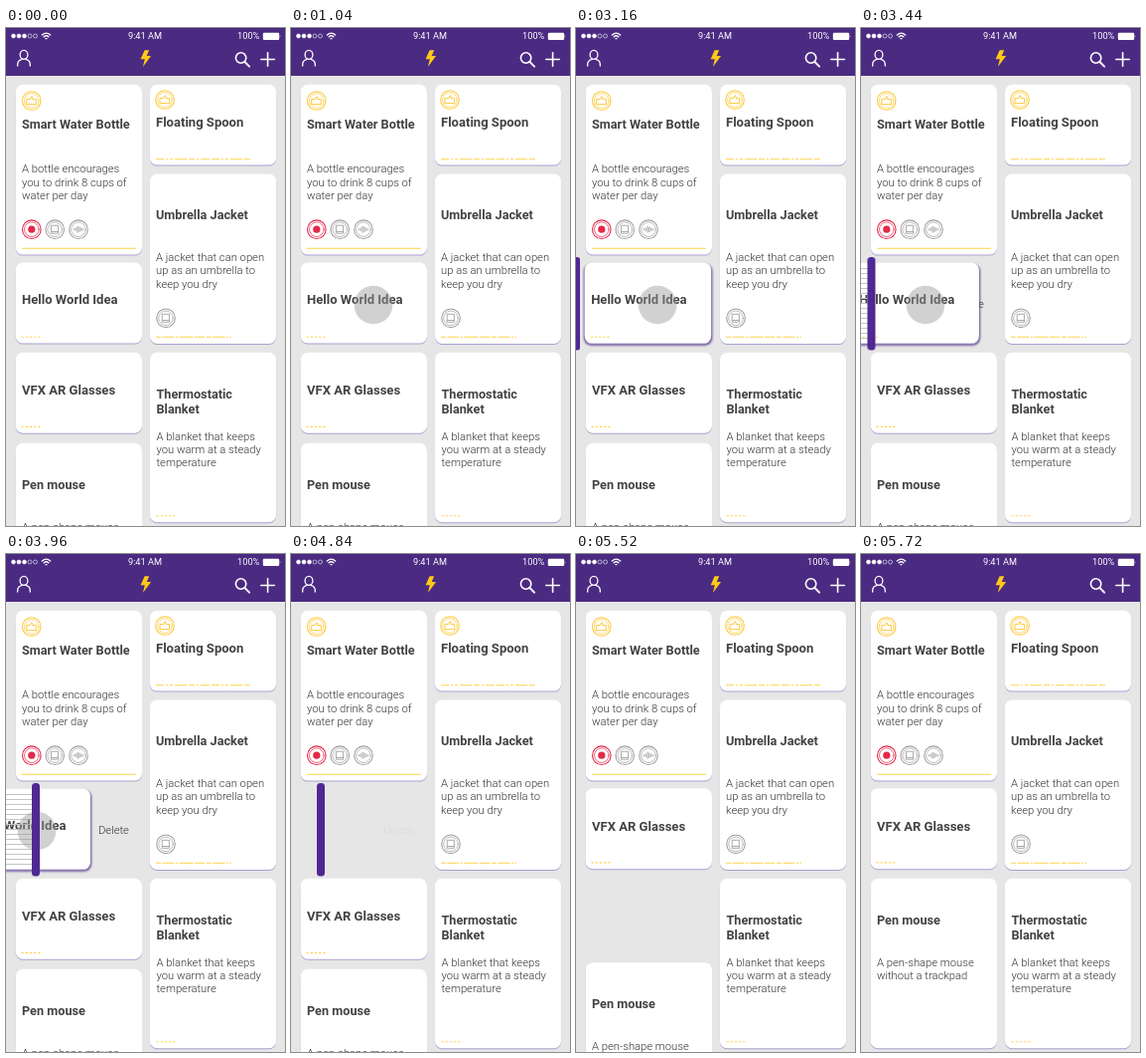
Recreate the animation shown at these times as an HTML page. Size 281 px wide and 500 px high, loop 6.76 s.

```html
<!DOCTYPE html>
<html lang="en">
<head>
<meta charset="utf-8">
<title>Swipe to shred</title>
<style>
  html, body { margin: 0; width: 100%; height: 100%; overflow: hidden; background: #e6e6e6; }
  svg { display: block; width: 281px; height: 500px; font-family: Roboto, sans-serif; }

  .card { fill: #fff; filter: drop-shadow(0 1.5px .3px #aaa0d0); }
  .title { font-size: 12.7px; font-weight: 700; fill: #424242; }
  .short { font-size: 13.05px; }
  .body { font-size: 11.24px; font-weight: 300; fill: #333; }
  .status { font-size: 9.2px; fill: #fff; }
  .line { fill: none; stroke: #ffd24a; stroke-width: 1.1; }
  .dots { stroke-dasharray: 2.2 2; }
  .icon { fill: none; stroke: currentColor; stroke-linecap: round; stroke-linejoin: round; }
  .like { color: #fdc93c; }
  .grey { color: #a0a0a0; }
  .red { color: #e4284a; }

  .card-move, .touch-move, .touch, .lift, .bar, .label, .first-up, .second-up {
    animation: 6760ms ease-in-out infinite both;
  }
  .card-move { animation-name: card-move; }
  .touch-move { animation-name: touch-move; }
  .touch { animation-name: touch; }
  .lift { animation-name: lift; }
  .bar { animation-name: bar; }
  .label { animation-name: label; }
  .first-up { animation-name: first-up; }
  .second-up { animation-name: second-up; }

  @keyframes touch {
    0%, 12.426% { opacity: 0; }
    15.385%, 65.68% { opacity: 1; }
    68.639%, 100% { opacity: 0; }
  }
  @keyframes lift {
    0%, 24.852% { opacity: 0; }
    27.811%, 100% { opacity: .95; }
  }
  @keyframes bar {
    0%, 34.32% { transform: translateX(-4px); }
    37.87%, 45.562% { transform: translateX(0); }
    58.58%, 74.556% { transform: translateX(30px); }
    77.219%, 100% { transform: translateX(-5px); }
  }
  @keyframes card-move {
    0%, 45.562% { transform: translateX(0); }
    58.58%, 65.68% { transform: translateX(-52px); }
    71.598%, 100% { transform: translateX(-142px); }
  }
  @keyframes touch-move {
    0%, 45.562% { transform: translateX(0); }
    58.58%, 100% { transform: translateX(-52px); }
  }
  @keyframes label {
    0%, 65.68% { opacity: 1; }
    71.598%, 74.556% { opacity: .06; }
    77.219%, 100% { opacity: 0; }
  }
  @keyframes first-up {
    0%, 77.219% { transform: translateY(0); }
    80.991%, 100% { transform: translateY(-90.5px); }
  }
  @keyframes second-up {
    0%, 80.991% { transform: translateY(0); }
    84.615%, 100% { transform: translateY(-91px); }
  }
</style>
</head>
<body>
<svg viewBox="0 0 281 500">
  <defs>
    <g id="ring" class="icon">
      <circle r="9.3" stroke-width="1.1"/>
      <circle r="7.3" stroke-width=".7"/>
    </g>
    <g id="like" class="icon like" stroke-width="1">
      <use href="#ring"/>
      <path d="M-4.6-1.4h3.2l1.4-3q1.6.2 1 3h3.6v5h-9.2z"/>
    </g>
    <g id="device" class="icon grey" stroke-width=".9">
      <use href="#ring"/>
      <path d="M-3.4-4h6.8v8h-6.8zM-3.4 2.2h6.8"/>
    </g>
    <g id="sound" class="icon grey" stroke-width="1">
      <use href="#ring"/>
      <path d="M-4.6-.4v.8M-2.8-1.4v2.8M-.9-3v6M.9-2.3v4.6M2.8-1.4v2.8M4.6-.4v.8"/>
    </g>
    <pattern id="strips" width="10" height="5" y="241" patternUnits="userSpaceOnUse">
      <path d="M0 .5h10" stroke="#c4c4c4"/>
    </pattern>
    <clipPath id="shredded"><rect class="bar" x="-160" y="225" width="160" height="105"/></clipPath>
    <filter id="soft" x="-10%" y="-10%" width="120%" height="120%"><feGaussianBlur stdDeviation="1.3"/></filter>
  </defs>

  <rect width="281" height="500" fill="#e6e6e6"/>

  <!-- right column -->
  <rect class="card" x="144.8" y="56.8" width="127.4" height="80.8" rx="7.5"/>
  <use href="#like" x="160" y="72"/>
  <text class="title short" x="151" y="99.3">Floating Spoon</text>
  <path class="line" d="M151 131.8h96" stroke-dasharray="8 2 2 2 3 2 12 2 6 2 2 2 9 2"/>

  <rect class="card" x="144.8" y="146.5" width="127.4" height="170.5" rx="7.5"/>
  <text class="title" x="151" y="192.3">Umbrella Jacket</text>
  <text class="body" y="234"><tspan x="151">A jacket that can open</tspan><tspan x="151" dy="13.3">up as an umbrella to</tspan><tspan x="151" dy="13.3">keep you dry</tspan></text>
  <use href="#device" x="161" y="291.3"/>
  <path class="line" d="M151 310.3h76" stroke-dasharray="5 1.5 12 1.5 2 1.5 14 1.5 10 2"/>

  <rect class="card" x="144.8" y="325.7" width="127.4" height="170.5" rx="7.5"/>
  <text class="title" y="371.7"><tspan x="151.5">Thermostatic</tspan><tspan x="151.5" dy="14.8">Blanket</tspan></text>
  <text class="body" y="413.8"><tspan x="151.5">A blanket that keeps</tspan><tspan x="151.5" dy="13.3">you warm at a steady</tspan><tspan x="151.5" dy="13.3">temperature</tspan></text>
  <path class="line dots" d="M151.5 489.8h19.5"/>

  <!-- left column -->
  <rect class="card" x="9.6" y="56.8" width="127.4" height="170.8" rx="7.5"/>
  <use href="#like" x="25.7" y="73"/>
  <text class="title" x="16" y="101.3">Smart Water Bottle</text>
  <text class="body" y="145.3"><tspan x="16">A bottle encourages</tspan><tspan x="16" dy="13.3">you to drink 8 cups of</tspan><tspan x="16" dy="13.3">water per day</tspan></text>
  <g class="red"><use href="#ring" x="25.8" y="202.2"/><circle cx="25.8" cy="202.2" r="3.6" fill="currentColor"/></g>
  <use href="#device" x="49.2" y="202.2"/>
  <use href="#sound" x="73" y="202.2"/>
  <path class="line" d="M16 221.2h115"/>

  <text class="body label" x="93" y="281.3">Delete</text>

  <g class="second-up">
    <rect class="card" x="9.6" y="416.7" width="127.4" height="170.5" rx="7.5"/>
    <text class="title" x="16" y="462.7">Pen mouse</text>
    <text class="body" y="504.6"><tspan x="16">A pen-shape mouse</tspan><tspan x="16" dy="13.3">without a trackpad</tspan></text>
  </g>

  <g class="first-up">
    <rect class="card" x="9.6" y="325.7" width="127.4" height="81" rx="7.5"/>
    <text class="title short" x="16" y="368">VFX AR Glasses</text>
    <path class="line dots" d="M15.5 400.4h19.5"/>
  </g>

  <g class="card-move">
    <rect class="lift" x="8.9" y="237" width="129" height="81.5" rx="7.5" fill="#4b2a82" filter="url(#soft)"/>
    <rect class="card" x="9.6" y="235.6" width="127.4" height="81" rx="7.5"/>
    <text class="title short" x="16" y="277.2">Hello World Idea</text>
    <path class="line dots" d="M15.5 310.2h19.5"/>
  </g>
  <g clip-path="url(#shredded)">
    <g class="card-move"><rect x="9.6" y="240" width="127.4" height="74" fill="url(#strips)"/></g>
  </g>
  <g class="touch-move"><circle class="touch" cx="83" cy="278" r="19.3" fill="#999" fill-opacity=".45"/></g>
  <rect class="bar" x="-4" y="230" width="8" height="93.5" rx="3.5" fill="#4f2893"/>

  <!-- header -->
  <rect width="281" height="48" fill="#4b2a82"/>
  <g fill="#fff" stroke="#fff" stroke-width=".6">
    <circle cx="7.5" cy="8" r="2"/><circle cx="13" cy="8" r="2"/><circle cx="18.5" cy="8" r="2"/>
    <g fill="none"><circle cx="24" cy="8" r="2"/><circle cx="29.5" cy="8" r="2"/></g>
  </g>
  <g class="icon" color="#fff" stroke-width="1.3">
    <path d="M36.3 7q4.2-3.8 8.4 0M38 8.9q2.5-2.2 5 0M40 10.7h1"/>
  </g>
  <text class="status" x="140" y="11.4" text-anchor="middle">9:41 AM</text>
  <text class="status" x="255.3" y="11.4" text-anchor="end">100%</text>
  <rect x="258.8" y="4.7" width="16.4" height="7.2" rx="1.2" fill="#fff"/>
  <path d="M275.8 7.2q1.3 1.1 0 2.2z" fill="#fff"/>
  <g class="icon" color="#fff" stroke-width="1.3">
    <ellipse cx="18" cy="26.8" rx="3.9" ry="4.5"/>
    <path d="M11.7 38v-1.4q0-4 4-5M24.3 38v-1.4q0-4-4-5"/>
    <circle cx="236.6" cy="30" r="5.2" stroke-width="1.6"/>
    <path d="M240.5 34l4.6 4.6" stroke-width="2"/>
    <path d="M256.8 31.5h13.6M263.6 24.7v13.6" stroke-width="1.6"/>
  </g>
  <path d="M139.6 22.3h4.6l-2.5 5.8h4.4l-8.2 10.8 1.9-7.7h-4.2z" fill="#ffc916"/>
</svg>
</body>
</html>
```
